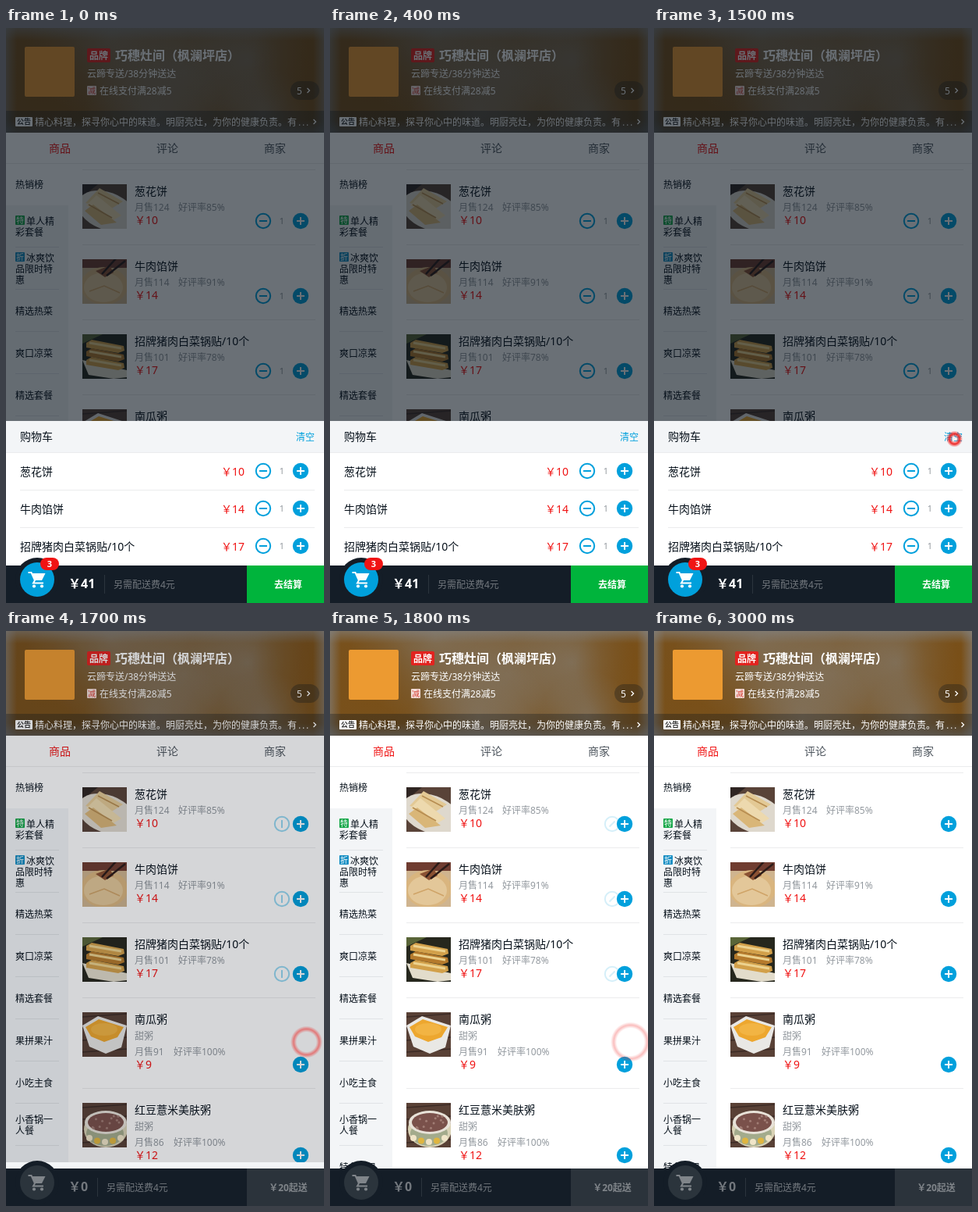
Animation, 408 px wide and 736 px high, one loop 3.1 s. Source, as an HTML page with a canvas:

```html
<!DOCTYPE html>
<html lang="zh-CN">
<head>
<meta charset="utf-8">
<title>购物车</title>
<style>
html, body { margin: 0; width: 100%; height: 100%; overflow: hidden; background: #fff; }
canvas { display: block; width: 408px; height: 736px; }
</style>
</head>
<body>
<canvas id="stage" width="408" height="736"></canvas>
<script>
const W = 408, H = 736, LOOP = 3100, TICK = 100, CLEAR_AT = 1500;
const ctx = document.getElementById('stage').getContext('2d');
const FONT = '"Noto Sans", "Noto Sans CJK SC", "Noto Sans CJK", sans-serif';
const INK = '#07111b', GREY = '#93999f', RED = '#f01414', BLUE = '#00a0dc';
const PALE = '#f3f5f7', LINE = 'rgba(7,17,27,.08)', FAINT = 'rgba(255,255,255,.4)';

const menu = ['热销榜', '特|单人精|彩套餐', '折|冰爽饮|品限时特|惠', '精选热菜', '爽口凉菜',
  '精选套餐', '果拼果汁', '小吃主食', '小香锅一|人餐', '特色粥品'];
const foods = [
  { y: 200, name: '葱花饼', sold: 124, rate: 85, price: 10, paint: scallionPie },
  { y: 296, name: '牛肉馅饼', sold: 114, rate: 91, price: 14, paint: beefPie },
  { y: 392, name: '招牌猪肉白菜锅贴/10个', sold: 101, rate: 78, price: 17, paint: potstickers },
  { y: 488, name: '南瓜粥', note: '甜粥', sold: 91, rate: 100, price: 9, paint: pumpkinBowl },
  { y: 604, name: '红豆薏米美肤粥', note: '甜粥', sold: 86, rate: 100, price: 12, paint: beanBowl }
];
const ordered = foods.slice(0, 3);

const clamp = (v, low, high) => Math.min(high, Math.max(low, v));

function rect(x, y, w, h, color, radius = 0) {
  ctx.fillStyle = color;
  ctx.beginPath();
  ctx.roundRect(x, y, w, h, radius);
  ctx.fill();
}

function ellipse(x, y, rx, ry, color, turn = 0) {
  ctx.fillStyle = color;
  ctx.beginPath();
  ctx.ellipse(x, y, rx, ry, turn, 0, Math.PI * 2);
  ctx.fill();
}

const disc = (x, y, r, color) => ellipse(x, y, r, r, color);

function shape(points, color) {
  ctx.fillStyle = color;
  ctx.beginPath();
  points.forEach(([x, y]) => ctx.lineTo(x, y));
  ctx.fill();
}

function stroke(points, color, width) {
  ctx.strokeStyle = color;
  ctx.lineWidth = width;
  ctx.beginPath();
  points.forEach(([x, y]) => ctx.lineTo(x, y));
  ctx.stroke();
}

// y is the optical centre of the line
function text(str, x, y, size, color, { align = 'left', weight = 400 } = {}) {
  ctx.font = `${weight} ${size}px ${FONT}`;
  ctx.textAlign = align;
  ctx.fillStyle = color;
  ctx.fillText(str, x, y + size * 0.38);
}

function glow(x, y, r, rgb, alpha) {
  const g = ctx.createRadialGradient(x, y, 0, x, y, r);
  g.addColorStop(0, `rgba(${rgb},${alpha})`);
  g.addColorStop(1, `rgba(${rgb},0)`);
  ctx.fillStyle = g;
  ctx.fillRect(x - r, y - r, 2 * r, 2 * r);
}

// Pale fade from an edge point towards an inner point
function edgeFade(x0, y0, x1, y1) {
  const g = ctx.createLinearGradient(x0, y0, x1, y1);
  g.addColorStop(0, 'rgba(131,134,138,.55)');
  g.addColorStop(1, 'rgba(131,134,138,0)');
  ctx.fillStyle = g;
  ctx.fillRect(0, 0, W, 134);
}

function tag(x, y, char, back, color = '#fff') {
  rect(x, y, 12, 12, back, 1);
  text(char, x + 6, y + 6, 10, color, { align: 'center' });
}

const chevron = (x, y) => stroke([[x - 1.5, y - 3], [x + 1.5, y], [x - 1.5, y + 3]], '#fff', 1.3);

function plus(x, y) {
  disc(x, y, 10.2, BLUE);
  rect(x - 5, y - 1, 10, 2, '#fff');
  rect(x - 1, y - 5, 2, 10, '#fff');
}

function minus(x, y, turn = 0, alpha = 1) {
  ctx.save();
  ctx.globalAlpha = alpha;
  ctx.translate(x, y);
  ctx.rotate(turn);
  ctx.strokeStyle = BLUE;
  ctx.lineWidth = 2;
  ctx.beginPath();
  ctx.arc(0, 0, 9.2, 0, Math.PI * 2);
  ctx.stroke();
  rect(-5, -1, 10, 2, BLUE);
  ctx.restore();
}

const count = (y) => text('1', 354, y, 11, GREY, { align: 'center' });

// Food pictures, each on a 57px square
function scallionPie() {
  rect(0, 0, 57, 57, '#594338');
  shape([[0, 0], [20, 0], [0, 16]], '#2f2522');
  ellipse(31, 34, 38, 24, '#ded8cd', 0.35);
  shape([[4, 24], [22, 5], [52, 22], [36, 32]], '#e3c995');
  shape([[5, 27], [18, 14], [50, 40], [38, 47]], '#edd9ae');
  shape([[3, 34], [14, 26], [44, 49], [24, 52]], '#d9b678');
  stroke([[8, 26], [38, 43]], '#b68c50', 1.5);
  stroke([[20, 11], [47, 25]], '#b68c50', 1.5);
}

function beefPie() {
  rect(0, 0, 57, 57, '#cfb48f');
  rect(0, 0, 57, 11, '#6f3c30');
  ellipse(28, 34, 30, 24, '#d9b57f');
  ellipse(27, 36, 25, 19, '#e3c799');
  shape([[17, 15], [35, 8], [40, 17], [29, 23]], '#8a5132');
  stroke([[25, 19], [44, -2]], '#2b1b18', 2.5);
  stroke([[31, 21], [55, 2]], '#2b1b18', 2.5);
  stroke([[9, 41], [28, 34], [48, 43]], '#cfa367', 1.5);
}

function potstickers() {
  rect(0, 0, 57, 57, '#26271d');
  shape([[0, 0], [26, 0], [0, 12]], '#596538');
  shape([[0, 33], [57, 46], [57, 55], [40, 57], [8, 52]], '#e2dccb');
  for (let i = 0; i < 3; i++) {
    const y = 13 + i * 11;
    shape([[5, y - 2], [12, y - 6], [53, y + 2], [54, y + 8], [46, y + 11], [5, y + 4]], i === 1 ? '#b57a2c' : '#d2a04a');
    stroke([[9, y - 2], [50, y + 5]], '#ecd28f', 3);
  }
}

function woodTable() {
  rect(0, 0, 57, 57, '#594136');
  for (let i = 0; i < 4; i++) stroke([[0, 6 + i * 15], [57, 2 + i * 15]], '#3c2b25', 1.5);
}

function pumpkinBowl() {
  woodTable();
  shape([[0, 17], [20, 5], [57, 17], [50, 45], [30, 53], [9, 44]], '#e9e8e5');
  shape([[4, 19], [21, 9], [53, 19], [45, 32], [28, 38], [11, 31]], '#eda72f');
  ellipse(28, 22, 17, 8, '#f2b443');
}

function beanBowl() {
  woodTable();
  ellipse(30, 34, 28, 23, '#d9d2b5');
  ellipse(29, 39, 24, 16, '#a3ab8c');
  for (let i = 0; i < 5; i++) disc(9 + i * 10, 45 + 5 * Math.sin(i * Math.PI / 4), 4, i % 2 ? '#dfb540' : '#f0e5c8');
  ellipse(30, 25, 27, 15, '#e8e2d8');
  ellipse(30, 25, 23, 12, '#7a514b');
  for (let i = 0; i < 12; i++) disc(30 + 17 * Math.cos(i * 2.4), 25 + 8 * Math.sin(i * 3.7), 1.5, '#a17d75');
}

function drawHeader() {
  ctx.save();
  ctx.beginPath();
  ctx.rect(0, 0, W, 134);
  ctx.clip();
  rect(0, 0, W, 134, '#78511d');
  [[135, 10, 110], [230, 55, 120], [310, 40, 80], [190, 110, 90], [330, 110, 60]]
    .forEach(([x, y, r]) => glow(x, y, r, '131,121,107', 0.65));
  [[50, 70, 70], [395, 45, 80]].forEach(([x, y, r]) => glow(x, y, r, '122,78,20', 0.6));
  edgeFade(0, 0, 0, 16);
  edgeFade(0, 134, 0, 118);
  edgeFade(0, 0, 14, 0);
  edgeFade(W, 0, W - 14, 0);
  rect(0, 106, W, 28, 'rgba(7,17,27,.3)');
  ctx.restore();

  rect(24, 24, 64, 64, '#ec9a31', 2);
  rect(104, 26, 30, 18, '#e2231f', 2);
  text('品牌', 119, 35, 12, '#fff', { align: 'center', weight: 700 });
  text('巧穗灶间（枫澜坪店）', 140, 35, 16, '#fff', { weight: 700 });
  text('云蹄专送/38分钟送达', 104, 58, 12, '#fff');
  tag(104, 74, '减', '#f3dfda', '#d8473c');
  text('在线支付满28减5', 120, 80, 12, '#fff');
  rect(365, 68, 37, 24, 'rgba(7,17,27,.3)', 12);
  text('5', 373, 80, 12, '#fff');
  chevron(388, 80);

  rect(12, 114, 22, 12, '#fff', 1);
  text('公告', 23, 120, 9, '#333', { align: 'center', weight: 700 });
  text('精心料理，探寻你心中的味道。明厨亮灶，为你的健康负责。有', 37, 120, 12, '#fff');
  for (let i = 0; i < 3; i++) rect(376 + i * 5, 123.5, 1.3, 1.3, '#fff');
  chevron(396, 120);
}

function drawTabs() {
  ['商品', '评论', '商家'].forEach((name, i) =>
    text(name, 69 + i * 138, 154, 14, i ? '#4d555d' : RED, { align: 'center' }));
  rect(0, 173, W, 1, LINE);
}

function drawMenu() {
  rect(0, 174, 80, 514, PALE);
  rect(0, 174, 80, 53, '#fff');
  menu.forEach((entry, i) => {
    const lines = entry.split('|');
    const badge = lines[0].length === 1 ? lines.shift() : '';
    const mid = 200 + i * 54, top = mid - (lines.length - 1) * 7;
    if (badge) tag(12, top - 7, badge, badge === '特' ? '#17a84b' : '#168fc4');
    lines.forEach((line, n) => text(line, badge && !n ? 26 : 12, top + n * 14, 12, INK));
    if (i) rect(12, mid + 26, 56, 1, LINE);
  });
}

function drawFoods(filled, leaving) {
  rect(98, 181, 299, 1, LINE);
  foods.forEach((food) => {
    const { y, note } = food, shift = note ? 21 : 0;
    ctx.save();
    ctx.translate(98, y);
    ctx.beginPath();
    ctx.rect(0, 0, 57, 57);
    ctx.clip();
    food.paint();
    ctx.restore();
    text(food.name, 165, y + 9, 14, INK);
    if (note) text(note, 165, y + 30, 12, GREY);
    text('月售' + food.sold, 165, y + 29 + shift, 12, GREY);
    text(`好评率${food.rate}%`, food.sold > 99 ? 221 : 215, y + 29 + shift, 12, GREY);
    text('￥' + food.price, 165, y + 46 + shift, 14, RED);
    const buttonY = y + 47 + (note ? 20 : 0);
    if (!note && filled) {
      minus(330, buttonY);
      count(buttonY);
    } else if (!note && leaving < 1) {
      minus(338 + 32 * leaving, buttonY, Math.PI * leaving, Math.pow(1 - leaving, 1.3));
    }
    plus(378, buttonY);
    rect(98, y + (note ? 97 : 77), 299, 1, LINE);
  });
}

function drawPanel(top) {
  rect(0, top, W, 185, '#fff');
  rect(0, top, W, 40, PALE);
  rect(0, top + 40, W, 1, LINE);
  text('购物车', 18, top + 20, 14, INK);
  text('清空', 396, top + 20, 12, BLUE, { align: 'right' });
  ordered.forEach((food, i) => {
    const y = top + 64 + i * 48;
    text(food.name, 18, y + 1, 14, INK);
    text('￥' + food.price, 306, y + 1, 14, RED, { align: 'right' });
    minus(330, y);
    count(y);
    plus(378, y);
    if (i < 2) rect(18, y + 24, 378, 1, LINE);
  });
}

function drawCartIcon(color) {
  stroke([[28.5, 697], [32.5, 697], [37, 707], [35, 710.5], [48, 710.5]], color, 2);
  shape([[33, 698], [50.5, 698], [46, 707], [37, 707]], color);
  disc(36, 714.5, 2.1, color);
  disc(46, 714.5, 2.1, color);
}

function drawBar(filled) {
  const total = filled ? ordered.reduce((sum, food) => sum + food.price, 0) : 0;
  const x = filled ? 126 : 117;
  rect(0, 688, W, 48, '#141d27');
  rect(309, 688, 99, 48, filled ? '#00b43c' : '#2b333b');
  disc(40, 706, 28, '#141d27');
  disc(40, 706, 22, filled ? BLUE : '#2b343c');
  drawCartIcon(filled ? '#fff' : '#80858a');
  if (filled) {
    rect(44, 678, 24, 16, RED, 8);
    text('3', 56, 686, 11, '#fff', { align: 'center', weight: 700 });
  }
  text('￥' + total, 80, 711, 16, filled ? '#fff' : FAINT, { weight: 700 });
  rect(x, 700, 1, 24, 'rgba(255,255,255,.1)');
  text('另需配送费4元', x + 12, 712, 12, FAINT);
  text(filled ? '去结算' : '￥20起送', 362, 712, 12, filled ? '#fff' : FAINT,
    { align: 'center', weight: 700 });
}

function drawRipple(step) {
  const x = 385.5, y = 526, r = 6.5 + 5 * step, outer = r + 4;
  const inner = Math.max(1, r - 4);
  const alpha = 0.95 * (1 - step / 4.3);
  const g = ctx.createRadialGradient(x, y, inner, x, y, outer);
  g.addColorStop(0, 'rgba(240,30,30,0)');
  g.addColorStop(0.5, `rgba(238,30,28,${alpha})`);
  g.addColorStop(1, 'rgba(240,30,30,0)');
  disc(x, y, outer, g);
}

function draw(time) {
  const step = Math.floor(time / TICK) - CLEAR_AT / TICK;
  const filled = step < 1;
  const shade = clamp(0.69 - 0.26 * step, 0, 0.6);
  const slide = filled ? 0 : 185 * (1 - 0.157 * Math.pow(0.27, step - 1));

  rect(0, 0, W, H, '#fff');
  drawHeader();
  drawTabs();
  drawMenu();
  drawFoods(filled, step / 4);
  if (shade > 0) rect(0, 0, W, H, `rgba(7,17,27,${shade})`);
  if (step < 3) drawPanel(503 + Math.round(slide));
  drawBar(filled);
  if (step >= 0 && step < 5) drawRipple(step);
}

function loop() {
  draw(performance.now() % LOOP);
  requestAnimationFrame(loop);
}
loop();
</script>
</body>
</html>
```
